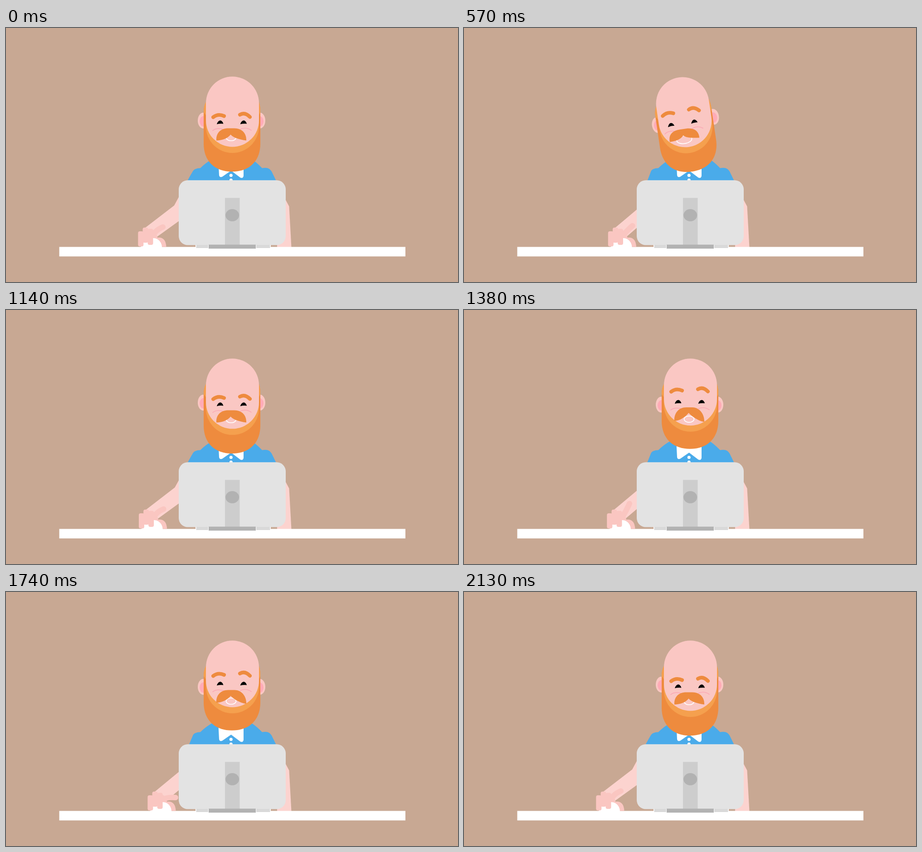
An HTML page for the animation above (2160 ms loop, 997x561 px).

```html
<!DOCTYPE html>
<html lang="en">
<head>
<meta charset="utf-8">
<title>At the desk</title>
<style>
  html, body { margin: 0; width: 100%; height: 100%; overflow: hidden; background: #c8a893; }
  svg { display: block; width: 100%; height: 100%; }
  .skin { fill: #fac7c3; }
  .hand { fill: #fac6c1; }
  .arm { fill: #fcd3cf; }
  .shirt { fill: #4aabea; }
  .dark { fill: #ee8b3e; }
  .light { fill: #f5a04e; }
  .blush { fill: #ffabb7; }
  .white { fill: #fff; }
  .line { fill: none; stroke-linecap: round; }
</style>
</head>
<body>
<svg viewBox="0 0 997 561">
  <!-- body -->
  <path class="arm" d="M606 362L617 380L624.5 394L629.5 484H598V440Z"/>
  <path id="forearm" class="arm"/>
  <path id="sleeve" class="shirt"/>
  <path class="shirt" d="M420 350V314L428 310Q441 297 456 289H540Q550 294 565 309.5Q580 306 586 317L602 350Z"/>
  <path class="white" d="M468.5 295L470 325Q471 331 477 328.5L496.5 315L517 330.5Q523.5 333 524 326V295Z"/>
  <circle class="white" cx="496.3" cy="325.5" r="3.5"/>
  <circle class="white" cx="496.3" cy="336" r="3.5"/>

  <g id="head">
    <g id="ears">
      <ellipse class="skin" cx="435" cy="204.5" rx="12" ry="17.5"/>
      <ellipse class="skin" cx="560" cy="204.5" rx="12" ry="17.5"/>
      <ellipse class="blush" cx="436" cy="206" rx="9" ry="11.5"/>
      <ellipse class="blush" cx="559" cy="206" rx="9" ry="11.5"/>
    </g>
    <path id="beard" class="dark"/>
    <path class="light" d="M441 163Q436 172 436 186L442 194V165ZM558 163Q561 172 561 186L557 194V165Z"/>
    <path id="rim" class="light"/>
    <path id="skull" class="skin"/>
    <g id="face">
      <path class="line" stroke="#fba9b4" stroke-width="1.6" d="M456 226.5Q466 219 481 224.5M517 223.5Q530 218 541 226"/>
      <path id="eyes"/>
      <ellipse id="mouth" cx="496.5" class="skin" stroke="#fff" stroke-width="1.7"/>
      <path id="moustache" class="dark"/>
      <path id="brows" class="line" stroke="#ee8b3e" stroke-width="8" d="M457 197Q468 188.5 481 194.5M516 191.5Q527 185 538 196.5"/>
    </g>
  </g>

  <!-- desk -->
  <rect class="white" x="117.5" y="483.5" width="763.5" height="21"/>
  <rect x="381" y="336.3" width="236" height="143.2" rx="20" fill="#e3e3e3"/>
  <rect x="483" y="375.3" width="32.5" height="104" fill="#cdcdcd"/>
  <ellipse cx="499.2" cy="413.5" rx="15" ry="13.5" fill="#b2b2b2"/>
  <rect class="white" x="418" y="479" width="166" height="8.5"/>
  <path fill="#d9d9d9" d="M419.5 479H446V486H419.5ZM552 479H582.5V486H552Z"/>
  <rect x="447" y="478.5" width="104" height="8.8" fill="#b2b2b2"/>

  <g id="hand">
    <path id="thumb" class="line" stroke="#fac6c1" stroke-width="12"/>
    <path class="hand" d="M303 446L323 447Q333 452 334 463Q352.5 461 353.5 483.5H303Z"/>
    <path class="white" d="M297 484Q301 471 313 467Q326 461 335 467Q343.5 473 344 484Z"/>
    <rect class="hand" x="291.3" y="449" width="12" height="33.5" rx="4"/>
    <rect class="hand" x="301.5" y="440.8" width="12" height="33.5" rx="4"/>
    <rect class="hand" x="312.5" y="443.5" width="12" height="35.5" rx="4"/>
    <rect class="hand" x="297" y="450" width="24" height="23"/>
  </g>
</svg>
<script>
  const LOOP = 2160, HALF = 1080, STEP = 30;
  const part = {};
  document.querySelectorAll("[id]").forEach(el => part[el.id] = el);

  const set = (name, attrs) => {
    for (const key in attrs) part[name].setAttribute(key, attrs[key]);
  };
  const ease = (t, from, to) => {
    const x = Math.min(1, Math.max(0, (t - from) / (to - from)));
    return (1 - Math.cos(Math.PI * x)) / 2;
  };
  // Rises from a to b, holds, falls from c to d.
  const swell = (t, a, b, c, d) => ease(t, a, b) - ease(t, c, d);
  const blink = t => Math.max(swell(t, 720, 795, 825, 900), swell(t, 1440, 1515, 1530, 1605));

  // Thumb poses: bend x, y, then tip x, y.
  const REST = [328, 447, 346, 439.5];
  const UP = [333, 446, 341, 427.5];
  const DOWN = [329, 452, 353, 454];
  const THUMB = [[0, REST], [60, REST], [300, UP], [510, UP], [660, DOWN], [810, REST], [HALF, REST]];

  function thumbPose(t) {
    const i = THUMB.findIndex(([time]) => time > t);
    const [t0, a] = THUMB[i - 1], [t1, b] = THUMB[i];
    const k = ease(t, t0, t1);
    return a.map((v, n) => v + (b[n] - v) * k);
  }

  const capsule = (left, right, top, bottom) => {
    const r = (right - left) / 2, arc = `A${r} ${r} 0 0 1 `;
    return `M${left} ${top + r}${arc}${right} ${top + r}V${bottom - r}${arc}${left} ${bottom - r}Z`;
  };

  function drawArm(t) {
    const move = swell(t, 0, 375, 563, 887), x = 26.5 * move;
    const [bx, by, tx, ty] = thumbPose(t);
    set("hand", { transform: `translate(${x} 0)` });
    set("thumb", { d: `M322 462Q${bx} ${by} ${tx} ${ty}` });
    set("forearm", {
      d: `M${385 + x} 366L${371 + x * .83} ${392 - move}L${306 + x} 442L${325 + x} 467L${395 + x * .83} ${416.5 - 6 * move}L440 380Z`
    });
    set("sleeve", {
      d: `M${393 + 6 * move} 350L${401 + 4 * move} 336Q${408 + 2 * move} 323 413 315Q418 309 430 309.5V350Z`
    });
  }

  function drawHead(t, phase) {
    const tilt = -8.5 * swell(t, 0, 360, 540, 945);
    const turn = swell(t, 0, 330, 650, 1050);
    const nod = swell(t, 1110, 1440, 1740, 2100);
    const lift = swell(phase, 60, 300, 540, 780);
    const grin = t < HALF ? lift : 0;

    set("head", { transform: `rotate(${tilt} 499 285)` });
    set("ears", { transform: `translate(${2.7 * turn} ${5 * nod})` });
    set("face", { transform: `translate(${-4.8 * turn} ${-6 * nod})` });
    set("brows", { transform: `translate(0 ${-11 * lift})` });

    const jaw = 317.3 - 11.5 * nod, chin = 262.5 - 8 * nod;
    set("beard", {
      d: `M441 165Q436 172 436 185V${jaw - 62}C436 ${jaw - 23.5} 460 ${jaw} 498.5 ${jaw}` +
         `S561 ${jaw - 23.5} 561 ${jaw - 62}V185Q561 172 558 165Z`
    });
    set("rim", { d: capsule(441, 558, 121, chin + 13.5) });
    set("skull", { d: capsule(441, 558, 107.3, chin) });

    const lid = 10 - 8.5 * blink(t);
    const eye = x => `M${x} 212.5C${x + 3.5} ${212 - lid} ${x + 11} ${211.5 - lid} ${x + 14.5} 211.5Q${x + 7} 210.5 ${x} 212.5Z`;
    set("eyes", { d: eye(465) + eye(516.7) });

    set("mouth", { cy: 242 + 3 * grin + 5 * nod, rx: 11 + 6 * grin, ry: 7 + 2 * grin });

    const left = 248.5 - 3 * grin + 2 * nod;
    const right = 248.5 - 3 * grin + 4.5 * nod;
    const top = 221.5 + nod * (3 - 4 * lift);
    const notch = 235.5 + nod * (3 - 6 * lift);
    set("moustache", {
      d: `M464 ${left}C463 ${left - 16} 473 ${top} 490 ${top}H504C520 ${top} 531 ${right - 16} 530 ${right}` +
         `C518 ${right - 1.5} 503 ${notch + 8} 495.5 ${notch}C489 ${notch + 8} 477 ${left} 464 ${left}Z`
    });
  }

  function frame(now) {
    const t = Math.floor((now - start) / STEP) * STEP % LOOP;
    drawArm(t % HALF);
    drawHead(t, t % HALF);
    requestAnimationFrame(() => frame(performance.now()));
  }

  const start = performance.now();
  frame(start);
</script>
</body>
</html>
```
